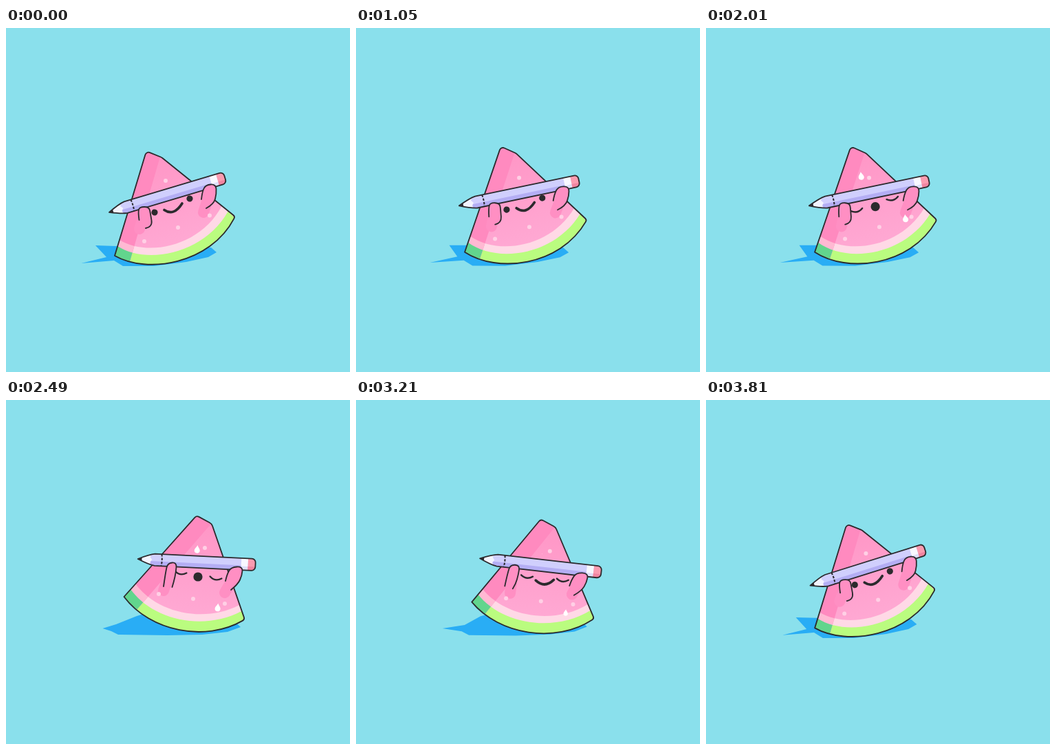
Animation of 500 by 500 pixels, one loop 3.84 s. Source, as an HTML page with a canvas:

```html
<!DOCTYPE html>
<html lang="en">
<head>
<meta charset="utf-8">
<title>Melon workout</title>
<style>
html, body { margin: 0; width: 100%; height: 100%; overflow: hidden; background: #8ae0ec; }
canvas { display: block; width: 500px; height: 500px; }
</style>
</head>
<body>
<canvas id="stage"></canvas>
<script>
const LOOP = 3840, SWING = 960, STEP = 30, RIGHT = 570;
const INK = '#2b2a2d', BG = '#8ae0ec', ARM = '#ff8fc3';
const canvas = document.getElementById('stage');
const ctx = canvas.getContext('2d');
const dpr = window.devicePixelRatio || 1;
canvas.width = canvas.height = 500 * dpr;

const rad = d => d * Math.PI / 180;
const wave = (t, lag = 0, n = 1) => Math.cos(2 * Math.PI * n * (t - lag) / SWING);
const mix = (a, b, k) => a + (b - a) * k;
const ramp = (t, from, to) => {
  const k = Math.min(1, Math.max(0, (t - from) / (to - from)));
  return k * k * (3 - 2 * k);
};

// The slice rocks once per swing and stretches twice.
const bodyPose = t => ({
  x: 252.4 - 7.4 * wave(t),
  y: 304.4 - 1.8 * wave(t, 52, 2),
  a: rad(-2 - 15.8 * wave(t, -10)),
  sx: 1,
  sy: 1 + 0.033 * wave(t, 186, 2)
});

const pencilPose = t => ({
  x: 257 - 23 * wave(t, 12),
  y: 239.8 + 2.9 * wave(t) - 2.3 * wave(t, 120, 2),
  a: rad(-4.5 - 13.2 * wave(t, -60)),
  sx: (174.5 + 4.5 * wave(t, 200)) / 174,
  sy: 1
});

function toLocal(p, x, y) {
  const c = Math.cos(p.a), s = Math.sin(p.a), dx = x - p.x, dy = y - p.y;
  return [(dx * c + dy * s) / p.sx, (dy * c - dx * s) / p.sy];
}

function toStage(p, x, y) {
  const c = Math.cos(p.a), s = Math.sin(p.a);
  x *= p.sx;
  y *= p.sy;
  return [p.x + x * c - y * s, p.y + x * s + y * c];
}

// Blends a point given in the left and the right lean, inside a moving frame.
function rig(pose, t) {
  const now = pose(t), left = pose(0), right = pose(RIGHT);
  const k = (1 - wave(t)) / (1 - wave(RIGHT));
  return (ax, ay, bx, by) => {
    const a = toLocal(left, ax, ay), b = toLocal(right, bx, by);
    return toStage(now, mix(a[0], b[0], k), mix(a[1], b[1], k));
  };
}

function fill(color) { ctx.fillStyle = color; ctx.fill(); }

function stroke(width, color = INK) {
  ctx.lineWidth = width;
  ctx.strokeStyle = color;
  ctx.stroke();
}

function dot(p, r, color) {
  ctx.beginPath();
  ctx.arc(p[0], p[1], r, 0, 7);
  fill(color);
}

function polygon(points) {
  ctx.beginPath();
  points.forEach(p => ctx.lineTo(...p));
  ctx.closePath();
}

function smooth(points) {
  ctx.beginPath();
  ctx.moveTo(...points[0]);
  for (let i = 1; i < points.length - 1; i++) {
    const p = points[i], q = points[i + 1];
    const end = i === points.length - 2 ? q : [(p[0] + q[0]) / 2, (p[1] + q[1]) / 2];
    ctx.quadraticCurveTo(...p, ...end);
  }
}

function drawShadow(t) {
  const k = (1 - wave(t)) / 1.83;
  const at = (ax, ay, bx, by) => [mix(ax, bx, k), mix(ay, by, k)];
  const tip = [124 - 16.5 * wave(t, 75), mix(342, 332, Math.min(1, k * 1.2))];
  polygon([
    tip, at(146, 333, 160, 326), at(130, 316, 190, 314), at(160, 317, 222, 304),
    at(298, 319, 330, 320), at(306, 326, 341, 330), at(294, 333, 322, 337),
    at(262, 340, 285, 341), at(215, 346, 235, 342), at(170, 346, 163, 341),
    at(157, 338, 153, 336)
  ]);
  fill('#29adf5');
}

function drawBody(at) {
  const apex = at(204, 179, 277, 168), top = at(226, 188, 299, 180);
  const right = at(333, 274, 347, 319), left = at(158, 331, 171.5, 286);
  const c1 = at(205, 358, 210, 337), c2 = at(297, 343, 290, 352);
  const outline = () => {
    ctx.beginPath();
    ctx.moveTo((apex[0] + left[0]) / 2, (apex[1] + left[1]) / 2);
    ctx.arcTo(...apex, ...top, 5);
    ctx.arcTo(...top, ...right, 9);
    ctx.arcTo(...right, ...c2, 4);
    ctx.bezierCurveTo(...c2, ...c1, ...left);
    ctx.closePath();
  };
  const greenArc = [at(162, 317, 181, 275), at(205, 345, 215, 322),
    at(289, 328, 290, 335), at(323, 266, 342, 307)];
  const paleArc = [at(165, 308, 188, 267), at(205, 333, 220, 311),
    at(283, 318, 290, 324), at(314, 258, 339, 298)];
  const below = (arc, color) => {
    ctx.beginPath();
    ctx.moveTo(...arc[0]);
    ctx.bezierCurveTo(...arc[1], ...arc[2], ...arc[3]);
    ctx.lineTo(...at(345, 290, 360, 335));
    ctx.lineTo(...at(260, 380, 250, 375));
    ctx.lineTo(...at(140, 350, 150, 300));
    ctx.closePath();
    fill(color);
  };

  ctx.save();
  outline();
  ctx.clip();
  const shade = ctx.createLinearGradient(...apex, ...at(250, 325, 258, 322));
  shade.addColorStop(0, '#ff95c5');
  shade.addColorStop(1, '#ffaad4');
  outline();
  fill(shade);
  below(paleArc, '#ffd9e6');
  below(greenArc, '#bafc7f');

  ctx.save();
  polygon([at(195, 165, 275, 155), at(224, 187, 298, 180),
    at(179, 343, 190, 305), at(140, 345, 155, 290)]);
  ctx.clip();
  outline();
  fill('#ff8abf');
  below(paleArc, '#ffb9d3');
  below(greenArc, '#62d58d');
  ctx.restore();
  ctx.restore();

  outline();
  stroke(1.8);
}

function drawLimb(from, to, width) {
  ctx.beginPath();
  ctx.moveTo(...from);
  ctx.lineTo(...to);
  stroke(width, ARM);
}

function drawDrop(pose, seed, dx, dy, size) {
  if (size <= 0) return;
  const s = toLocal(pose, ...seed);
  const p = toStage(pose, s[0] + dx, s[1] + dy);
  ctx.save();
  ctx.translate(...p);
  ctx.rotate(pose.a * 0.5);
  ctx.scale(size, size);
  ctx.beginPath();
  ctx.moveTo(0, -6);
  ctx.bezierCurveTo(1, -3, 4, -1, 4, 2);
  ctx.bezierCurveTo(4, 7, -4, 7, -4, 2);
  ctx.bezierCurveTo(-4, -1, -1, -3, 0, -6);
  fill('#fff');
  ctx.restore();
}

function drawSeeds(t, at, pose) {
  const high = at(232, 222, 289, 215), low = at(296, 272.5, 318, 296);
  [high, low, at(201, 310, 222, 282), at(250, 290, 272, 289)]
    .forEach(p => dot(p, 3, '#ffd0e5'));
  const grow = ramp(t, 1860, 1980);
  drawDrop(pose, high, -10.5, -5.6 + 11 * ramp(t, 1950, 2650), grow * (1 - ramp(t, 2900, 3270)));
  drawDrop(pose, low, -9, -0.5 + 14 * ramp(t, 1900, 3000), grow * (1 - 0.2 * ramp(t, 2900, 3210) - 0.8 * ramp(t, 3210, 3420)));
}

function drawFace(t, at, pose) {
  const shut = ramp(t, 1830, 1920) - ramp(t, 3390, 3480);
  const gasp = ramp(t, 1830, 1920) - ramp(t, 2820, 2910);
  const eyes = [at(216, 268, 254, 250), at(267, 248, 305, 258)];

  for (const eye of eyes) {
    ctx.save();
    ctx.translate(...eye);
    ctx.rotate(pose.a);
    ctx.beginPath();
    if (shut < 0.5) {
      ctx.ellipse(0, 0, 4.6, 4.6 * (1 - shut), 0, 0, 7);
      fill(INK);
    } else {
      ctx.moveTo(-8.5, 0);
      ctx.quadraticCurveTo(0, 6.5, 8.5, 0);
      stroke(2.4);
    }
    ctx.restore();
  }

  if (gasp > 0.5) {
    dot(at(243, 262, 279, 257), 6.6 * gasp, INK);
  } else {
    smooth([at(230, 264.5, 266, 258), at(244, 274, 279, 270.5), at(256, 255, 292, 258)]);
    stroke(3.7);
  }
}

function drawPencil(p) {
  const H = 8.6;
  const outline = () => {
    ctx.beginPath();
    ctx.moveTo(-87, 0);
    ctx.quadraticCurveTo(-70, -7.6, -62, -H);
    ctx.arcTo(87, -H, 87, 0, 5.5);
    ctx.arcTo(87, H, 70, H, 5.5);
    ctx.lineTo(-62, H);
    ctx.quadraticCurveTo(-70, 7.6, -87, 0);
    ctx.closePath();
  };
  const block = (x, w, y, h, color) => {
    ctx.fillStyle = color;
    ctx.fillRect(x, y, w, h);
  };

  ctx.save();
  ctx.translate(p.x, p.y);
  ctx.rotate(p.a);
  ctx.scale(p.sx, 1);
  ctx.save();
  outline();
  ctx.clip();
  block(-90, 180, -10, 20, '#d0cffd');
  block(-68, 136, 2, 8, '#b4aef4');
  block(66, 10, -10, 20, '#f8f8ff');
  block(66, 10, 3, 7, '#dfe0fa');
  block(76, 12, -10, 20, '#fa9bb0');
  block(76, 12, 3, 7, '#f084a0');
  polygon([[-90, -10], [-66, -10], [-69, -4], [-66, 0], [-69, 4], [-66, 10], [-90, 10]]);
  fill('#f3f4ff');
  block(-88, 7, -10, 20, INK);
  ctx.restore();

  outline();
  stroke(1.8);
  ctx.beginPath();
  ctx.moveTo(-52, -H);
  ctx.quadraticCurveTo(-50.5, 0, -52, H);
  ctx.setLineDash([3.4, 2]);
  stroke(2);
  ctx.restore();
}

function drawHand(points) {
  smooth(points);
  fill(ARM);
  stroke(1.8);
}

function draw(t) {
  ctx.setTransform(dpr, 0, 0, dpr, 0, 0);
  ctx.fillStyle = BG;
  ctx.fillRect(0, 0, 500, 500);
  ctx.lineJoin = 'round';
  ctx.lineCap = 'round';

  const pose = bodyPose(t), onBody = rig(bodyPose, t), onPencil = rig(pencilPose, t);
  drawShadow(t);
  drawBody(onBody);
  drawLimb(onPencil(201, 270, 239, 248), onBody(194, 292, 229, 277), 16);
  drawLimb(onPencil(296, 240, 333, 254), onBody(287, 268, 318, 280), 16);
  drawSeeds(t, onBody, pose);
  drawFace(t, onBody, pose);
  ctx.lineCap = 'butt';
  drawPencil(pencilPose(t));
  ctx.lineCap = 'round';
  drawHand([
    onPencil(193.5, 279, 229, 271), onPencil(192, 268, 232, 250), onPencil(194, 260, 235, 237),
    onPencil(208, 260, 248, 236), onPencil(210, 270, 247, 250),
    onPencil(213, 289, 244, 264), onPencil(203, 291, 241.5, 272)
  ]);
  drawHand([
    onPencil(284, 249, 319, 263), onPencil(285, 239, 321, 254), onPencil(290, 228, 327, 243),
    onPencil(305, 227, 344, 242), onPencil(306, 241, 343, 255),
    onPencil(302, 256, 337, 268), onPencil(291, 262, 327, 276)
  ]);
}

const start = performance.now();
function tick() {
  const t = (performance.now() - start) % LOOP;
  draw(Math.floor(t / STEP) * STEP);
  requestAnimationFrame(tick);
}
tick();
</script>
</body>
</html>
```
